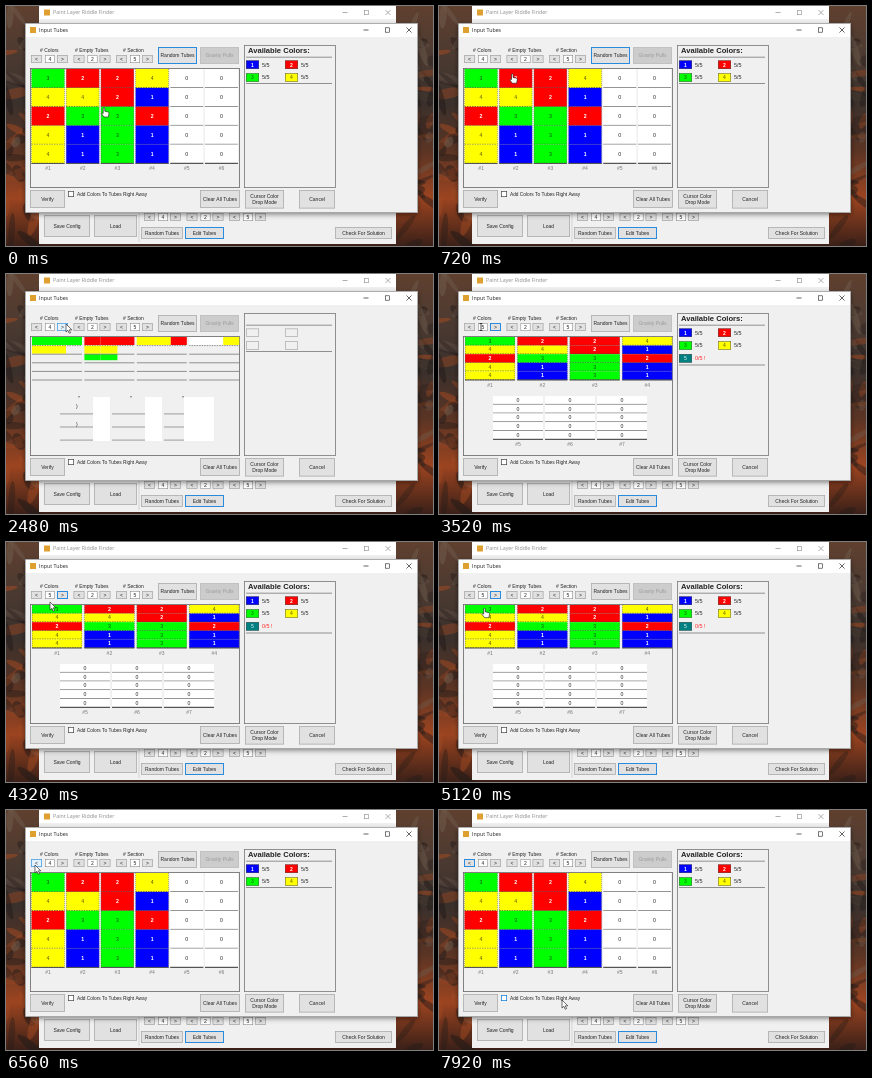
Write an HTML page with a canvas that moves like this. It is 427 by 240 pixels and loops after 8 s.

```html
<!DOCTYPE html>
<html lang="en">
<head>
<meta charset="utf-8">
<title>Tube editor</title>
<style>
html, body { margin: 0; width: 100%; height: 100%; overflow: hidden; background: #2b211d; }
canvas { display: block; width: 427px; height: 240px; }
</style>
</head>
<body>
<canvas id="stage"></canvas>
<script>
const W = 427, H = 240, LOOP = 8000;
const CLEAR = 2440, SHOW_FIVE = 2600, SHOW_FOUR = 6200, TRAVEL = 800;
const canvas = document.getElementById('stage');
const dpr = window.devicePixelRatio || 1;
canvas.width = W * dpr;
canvas.height = H * dpr;
const c = canvas.getContext('2d');
c.scale(dpr, dpr);

const SANS = '"Liberation Sans", Arial, sans-serif';
const UI = '"Open Sans", "Noto Sans", sans-serif';
const BLUE = '#0078d7', FACE = '#f0f0f0';
const INK = ['#222', '#fff', '#fff', '#164d16', '#55500a', '#fff'];
const FILL = ['#fff', '#00f', '#f00', '#0f0', '#ff0', '#008080'];
const TUBES = ['34244', '24311', '22333', '41211'];

// pointer stops: arrival time, x, y
const STOPS = [[0, 98, 102], [1040, 60, 50], [3440, 42, 53], [4720, 46, 67], [5840, 29, 55], [7760, 123, 190]];

function rect(x, y, w, h, fill) {
  c.fillStyle = fill;
  c.fillRect(x, y, w, h);
}

function frame(x, y, w, h, color, width = 0.8) {
  c.strokeStyle = color;
  c.lineWidth = width;
  c.strokeRect(x + width / 2, y + width / 2, w - width, h - width);
}

function line(x1, y1, x2, y2, color, width = 0.7, dash = []) {
  c.strokeStyle = color;
  c.lineWidth = width;
  c.setLineDash(dash);
  c.beginPath();
  c.moveTo(x1, y1);
  c.lineTo(x2, y2);
  c.stroke();
  c.setLineDash([]);
}

function text(s, x, y, { size = 5, color = '#222', align = 'left', font = SANS, weight = 400 } = {}) {
  c.font = `${weight} ${size}px ${font}`;
  c.fillStyle = color;
  c.textAlign = align;
  c.fillText(s, x, y + size * 0.36);
}

const inside = (p, x, y, w, h) => p.x >= x && p.x < x + w && p.y >= y && p.y < y + h;

function button(label, x, y, w, h, { focus = false, off = false, hover = false } = {}) {
  rect(x, y, w, h, off ? '#ccc' : hover ? '#e5f1fb' : '#e1e1e1');
  frame(x, y, w, h, off ? '#bfbfbf' : hover ? '#4aa0e4' : focus ? '#2a8ade' : '#adadad', focus && !hover ? 1 : 0.8);
  const rows = label.split('\n');
  rows.forEach((s, i) => text(s, x + w / 2, y + h / 2 + (i - (rows.length - 1) / 2) * 6,
    { align: 'center', color: off ? '#9a9a9a' : '#222' }));
}

function spinner(x, y, value, p, focus) {
  for (const [sign, left] of [['<', x], ['>', x + 26]]) {
    button(sign, left, y, 11, 8, { hover: inside(p, left, y, 11, 8), focus: focus === sign });
  }
  rect(x + 14, y, 10, 8, '#fff');
  frame(x + 14, y, 10, 8, '#8a8a8a', 0.6);
  text(value, x + 19, y + 4, { align: 'center' });
}

function titleBar(x, y, w, h, title, color, right) {
  rect(x, y, w, h, '#fff');
  const mid = y + h / 2, d = 2.5, [min, max, close] = [right - 43, right - 21.5, right];
  rect(x + 5, mid - 3, 6, 6, '#e0a030');
  text(title, x + 14, mid, { size: 5.3, font: UI, color });
  line(min - d, mid, min + d, mid, color);
  frame(max - d, mid - d, 5, 5, color, 0.6);
  line(close - d, mid - d, close + d, mid + d, color);
  line(close + d, mid - d, close - d, mid + d, color);
}

function seeded(seed) {
  return () => (seed = (seed * 16807) % 2147483647) / 2147483647;
}

// blurred dark and rust shapes behind the windows
function wallpaper() {
  const g = c.createLinearGradient(0, 0, 0, H);
  ['#60402f', '#4c3a31', '#3a302c', '#5a3424', '#9c4420', '#3a2018'].forEach((s, i) => g.addColorStop(i / 5, s));
  rect(0, 0, W, H, g);
  const rnd = seeded(77);
  const tones = ['#1d1918', '#241c1a', '#a24a22', '#6f5c4e'];
  for (let i = 0; i < 90; i++) {
    c.globalAlpha = 0.25 + rnd() * 0.3;
    c.fillStyle = tones[Math.floor(rnd() * tones.length)];
    c.beginPath();
    c.ellipse((i % 2 ? 390 : -4) + rnd() * 40, rnd() * H, 2 + rnd() * 4, 5 + rnd() * 14, rnd() * 3, 0, 7);
    c.fill();
  }
  c.globalAlpha = 1;
}

function backWindow(p) {
  rect(33, 0, 357, 238, FACE);
  titleBar(33, 0, 357, 13, 'Paint Layer Riddle Finder', '#8c8c8c', 382);
  line(133, 207, 133, 236, '#c8c8c8');
  button('Save Config', 38, 209, 46, 22);
  button('Load', 88, 209, 43, 22);
  ['4', '2', '5'].forEach((v, i) => spinner(138 + i * 42.5, 207, v, p));
  button('Random Tubes', 135, 221, 42, 12);
  button('Edit Tubes', 179, 221, 39, 12, { focus: true });
  button('Check For Solution', 329, 221, 57, 12);
}

function tube(n, x, y, w, rowH) {
  const h = rowH * 5;
  rect(x, y, w, h, '#fff');
  [...(TUBES[n] || '00000')].forEach((v, i) => {
    const top = y + i * rowH, base = top + rowH - 0.3;
    rect(x, top, w, rowH, FILL[v]);
    line(x, base, x + w, base, '#444', 0.7, v > 0 ? [1.5, 1] : []);
    text(v, x + w / 2, top + rowH / 2 - 0.3, { align: 'center', color: INK[v], size: 5.2, weight: v == 1 || v == 2 ? 700 : 400 });
  });
  if (n < 4) {
    for (const side of [x + 0.2, x + w - 0.2]) line(side, y, side, y + h, '#666', 0.5, [1, 1]);
  }
  line(x, y + h, x + w, y + h, '#555', 1);
  text('#' + (n + 1), x + w / 2, y + h + 5, { align: 'center', color: '#777' });
}

function sixTubes() {
  for (let i = 0; i < 6; i++) tube(i, 25.5 + i * 34.7, 63, 33, 18.9);
}

const topX = i => 26 + i * 52.4;
const lowX = i => 54 + i * 52;

function sevenTubes() {
  for (let i = 0; i < 4; i++) tube(i, topX(i), 63, 50, 8.6);
  for (let i = 0; i < 3; i++) tube(i + 4, lowX(i), 122, 50, 8.7);
}

// half-painted panel while the tubes are laid out again
function redraw() {
  const left = ['34', '243', '4', '0'], right = ['3', '243', '2', '4'];
  const stack = (x, w, cells, narrow) => [...cells].forEach((v, r) =>
    rect(x, 63 + r * 8.6, r ? narrow : w, r > 1 ? 6 : 8, FILL[v]));
  for (let i = 0; i < 4; i++) {
    const x = topX(i), cut = i === 1 ? 16 : 34;
    stack(x, cut, left[i], cut);
    stack(x + cut, 50 - cut, right[i], 17);
    for (let r = 1; r <= 5; r++) line(x, 63 + r * 8.6, x + 50, 63 + r * 8.6, '#666', 0.7, r === 1 ? [1.5, 1] : []);
  }
  for (let i = 0; i < 3; i++) {
    const x = lowX(i), cut = i < 2 ? 33 : 20;
    rect(x + cut, 123, 50 - cut, 44, '#fff');
    for (let r = 0; r < 3; r++) line(x, 139.9 + r * 13.1, x + cut, 139.9 + r * 13.1, '#777');
    line(x + 18, 122.8, x + 20, 122.8, '#444');
  }
  text(')', 70, 132);
  text(')', 70, 150);
}

function swatch(n, painting) {
  const x = n % 2 ? 240 : 279, y = 54.5 + Math.floor((n - 1) / 2) * 12.8;
  if (painting) return frame(x, y, 13, 8.5, '#aaa', 0.7);
  rect(x, y, 13, 8.5, FILL[n]);
  frame(x, y, 13, 8.5, '#555', 0.5);
  text(n, x + 6.5, y + 4.2, { align: 'center', color: INK[n], weight: n < 3 ? 700 : 400 });
  text(n < 5 ? '5/5' : '0/5 !', x + 16, y + 4.2, { size: 5.4, color: n < 5 ? '#222' : '#f22' });
}

function available(five, painting) {
  frame(238, 39, 92, 143, '#777');
  if (!painting) text('Available Colors:', 242, 44.2, { size: 7.6, weight: 700 });
  for (let n = 1; n <= (five ? 5 : 4); n++) swatch(n, painting);
  for (const y of [51.2, five ? 91 : 77.5]) line(240, y, 326, y, '#666');
}

function frontWindow(t, p) {
  const five = t >= SHOW_FIVE && t < SHOW_FOUR;
  const painting = t >= CLEAR && t < SHOW_FIVE;
  const focus = t < CLEAR ? 'random' : t < SHOW_FOUR ? '>' : '<';

  c.save();
  c.shadowColor = 'rgba(0,0,0,.45)';
  c.shadowBlur = 5 * dpr;
  c.shadowOffsetY = 1.5 * dpr;
  rect(19, 17, 393, 190, FACE);
  c.restore();
  titleBar(19, 17, 393, 14, 'Input Tubes', '#222', 403);
  frame(19, 17, 393, 190, '#777', 0.6);

  text('# Colors', 34, 44);
  text('# Empty Tubes', 69, 44);
  text('# Section', 117, 44);
  [five ? '5' : '4', '2', '5'].forEach((v, i) => spinner(25 + i * 42.5, 49, v, p, i ? '' : focus));
  button('Random Tubes', 152, 41, 39, 17, { focus: focus === 'random' });
  button('Gravity Pulls', 194, 41, 39, 17, { off: true });

  frame(24, 62, 210, 120, '#666');
  (painting ? redraw : five ? sevenTubes : sixTubes)();
  available(five, painting);

  button('Verify', 24, 184, 35, 18);
  rect(62, 185, 6, 6, '#fff');
  frame(62, 185, 6, 6, inside(p, 62, 184, 80, 8) ? BLUE : '#444', 0.7);
  text('Add Colors To Tubes Right Away', 71, 188, { size: 4.8 });
  button('Clear All Tubes', 194, 184, 40, 18);
  button('Cursor Color\nDrop Mode', 239, 184, 39, 18.5);
  button('Cancel', 293, 184, 36, 18.5);
  return five;
}

function pointerAt(t) {
  let [, x, y] = STOPS[0];
  for (const [end, x1, y1] of STOPS.slice(1)) {
    const u = Math.min(1, Math.max(0, (t - end + TRAVEL) / TRAVEL)), e = u * u * (3 - 2 * u);
    x += (x1 - x) * e;
    y += (y1 - y) * e;
  }
  return { x, y };
}

function pointer(p, five) {
  c.save();
  c.translate(p.x, p.y);
  if (inside(p, 39, 49, 10, 8)) {
    line(0, -3.5, 0, 3.5, '#111');
    for (const y of [-3.5, 3.5]) line(-1.5, y, 1.5, y, '#111');
  } else {
    const hand = inside(p, 26, 63, five ? 207 : 137, five ? 43 : 95);
    const path = new Path2D(hand
      ? 'M-.8 0Q0-.8.8 0V3.2L4.2 4Q5.2 4.3 5 5.5L4.3 9H0L-2.6 5.6Q-2.6 4.4-.8 5.4Z'
      : 'M0 0V8L1.9 6.3 3.2 9.2 4.6 8.6 3.3 5.8H5.8Z');
    c.lineWidth = 0.6;
    c.lineJoin = 'round';
    c.strokeStyle = '#111';
    c.fillStyle = '#fff';
    c.fill(path);
    c.stroke(path);
  }
  c.restore();
}

function draw(t) {
  const p = pointerAt(t);
  wallpaper();
  backWindow(p);
  pointer(p, frontWindow(t, p));
}

const start = performance.now();
function tick() {
  draw((performance.now() - start) % LOOP);
  requestAnimationFrame(tick);
}
tick();
</script>
</body>
</html>
```
